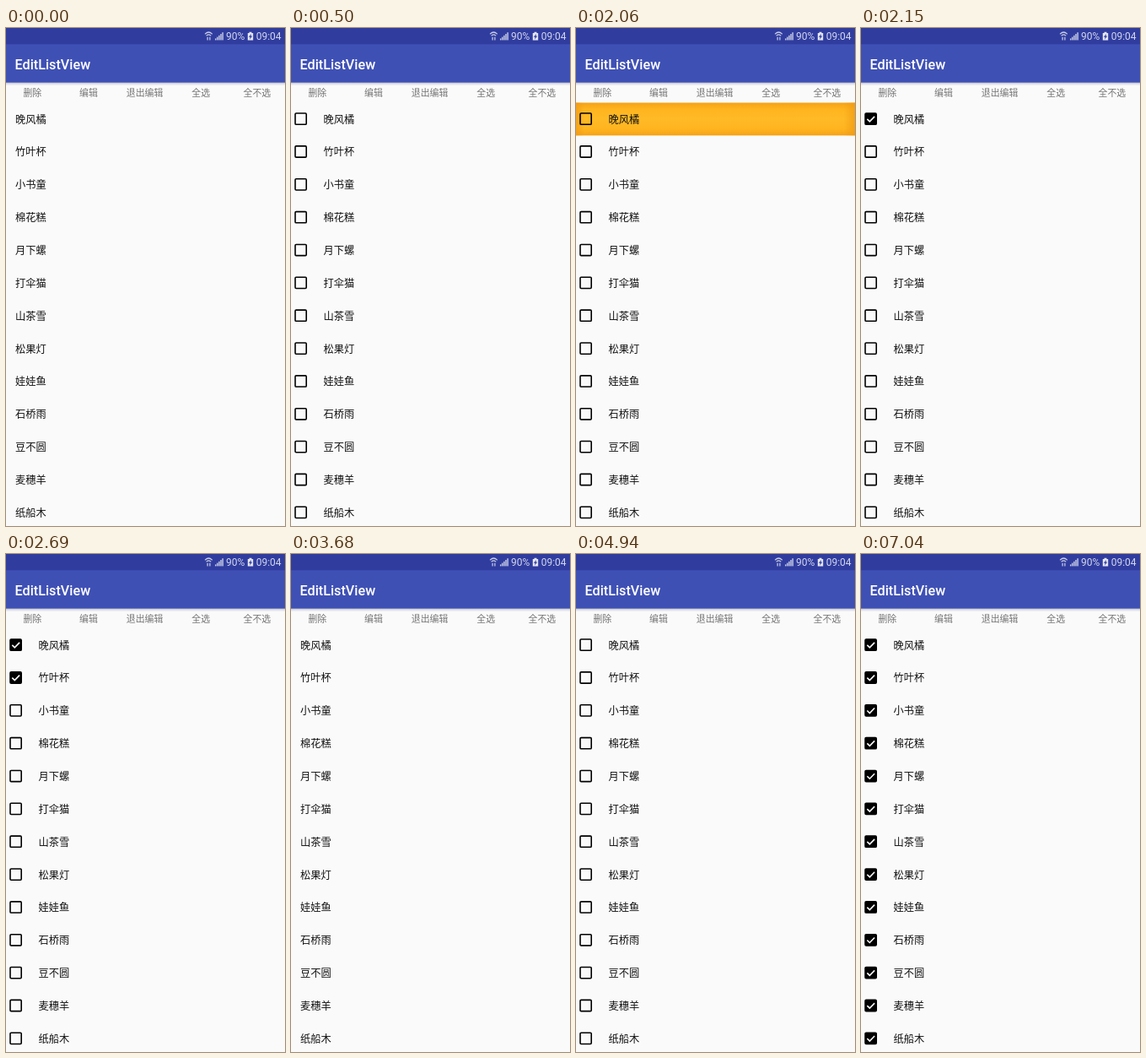
These frames come from a looping animation (331x590 px, 8 s). An HTML page:

```html
<!DOCTYPE html>
<html lang="zh-CN">
<head>
<meta charset="utf-8">
<title>EditListView</title>
<style>
  html, body { margin: 0; width: 100%; height: 100%; overflow: hidden; background: #fafafa; }
  svg { display: block; width: 331px; height: 590px; }
  text { font-family: "Noto Sans CJK SC", "Noto Sans CJK", sans-serif; }
  .latin { font-family: Roboto, sans-serif; }
  .tab { font-size: 10.9px; fill: #757575; text-anchor: middle; }
  .name { font-size: 12.25px; fill: #111; }
</style>
</head>
<body>
<svg id="stage" viewBox="0 0 331 590">
  <defs>
    <linearGradient id="shadow" x2="0" y2="1">
      <stop offset="0" stop-color="#b4b6cc"/>
      <stop offset=".5" stop-color="#dfdfe6"/>
      <stop offset="1" stop-color="#fafafa"/>
    </linearGradient>
    <linearGradient id="glowY" x2="0" y2="1">
      <stop offset="0" stop-color="#f5a217"/>
      <stop offset=".2" stop-color="#ffb41f"/>
      <stop offset=".5" stop-color="#ffba26"/>
      <stop offset=".8" stop-color="#ffb41f"/>
      <stop offset="1" stop-color="#f5a217"/>
    </linearGradient>
    <linearGradient id="glowX">
      <stop offset="0" stop-color="#ef9a14" stop-opacity=".7"/>
      <stop offset=".03" stop-color="#ef9a14" stop-opacity="0"/>
      <stop offset=".96" stop-color="#ef9a14" stop-opacity="0"/>
      <stop offset="1" stop-color="#ef9a14" stop-opacity=".75"/>
    </linearGradient>
  </defs>

  <rect width="331" height="590" fill="#fafafa"/>
  <rect y="64" width="331" height="4.5" fill="url(#shadow)"/>
  <rect width="331" height="64.6" fill="#3f50b5"/>
  <rect width="331" height="19.3" fill="#303d9f"/>

  <g fill="none" stroke="#ccd0e9" stroke-width="1.2" stroke-linecap="round">
    <path d="M236.4 6.9Q240.4 3.1 244.4 6.9M238 8.9Q240.4 6.7 242.8 8.9"/>
    <path d="M239.1 11v3M241.9 11v3"/>
  </g>
  <g id="signal" fill="#ccd0e9"></g>
  <g fill="#d3d6ec" font-size="12">
    <text class="latin" x="261" y="14.3">90%</text>
    <text class="latin" x="296.7" y="14.3">09:04</text>
  </g>
  <path d="M286.8 6h1.7V4.8h3V6h1.7v8.6h-6.4z" fill="#e4e6f4"/>
  <path d="M291 6.7l-3.1 4h1.8l-.6 3 3.1-4.2h-1.8z" fill="#303d9f"/>

  <text class="latin" x="10.5" y="48.7" font-size="16.2" font-weight="500" fill="#fff">EditListView</text>
  <g id="tabs"></g>
  <g id="glow">
    <rect width="331" height="38.85" fill="url(#glowY)"/>
    <rect width="331" height="38.85" fill="url(#glowX)"/>
  </g>
  <g id="rows"></g>
</svg>
<script>
const LOOP = 8000, ROW_TOP = 88.5, ROW_HEIGHT = 38.85;
const TABS = ["删除", "编辑", "退出编辑", "全选", "全不选"];
const NAMES = ["晚风橘", "竹叶杯", "小书童", "棉花糕", "月下螺", "打伞猫", "山茶雪",
  "松果灯", "娃娃鱼", "石桥雨", "豆不圆", "麦穗羊", "纸船木"];

// Each state holds from its start; `checked` counts ticked rows from the top.
const STATES = [
  { at: 0, editing: false, checked: 0, pressed: -1 },
  { at: 500, editing: true, checked: 0, pressed: -1 },
  { at: 2060, editing: true, checked: 0, pressed: 0 },
  { at: 2150, editing: true, checked: 1, pressed: -1 },
  { at: 2570, editing: true, checked: 1, pressed: 1 },
  { at: 2690, editing: true, checked: 2, pressed: -1 },
  { at: 3680, editing: false, checked: 0, pressed: -1 },
  { at: 4940, editing: true, checked: 0, pressed: -1 },
  { at: 7040, editing: true, checked: NAMES.length, pressed: -1 }
];

const byId = id => document.getElementById(id);

function add(parent, tag, attrs, content = "") {
  const node = document.createElementNS("http://www.w3.org/2000/svg", tag);
  for (const key in attrs) node.setAttribute(key, attrs[key]);
  node.textContent = content;
  return parent.appendChild(node);
}

const show = (node, visible) => node.setAttribute("visibility", visible ? "visible" : "hidden");

for (let i = 0; i < 5; i++) {
  const height = 2 + i * 1.8;
  add(byId("signal"), "rect", { x: 248 + i * 2.1, y: 14.4 - height, width: 1.4, height });
}

TABS.forEach((label, i) =>
  add(byId("tabs"), "text", { class: "tab", x: 31.3 + i * 66.65, y: 81.2 }, label));

const rows = NAMES.map((name, i) => {
  const y = ROW_TOP + ROW_HEIGHT * (i + 0.5);
  const row = add(byId("rows"), "g", { transform: `translate(0 ${y})` });
  const box = add(row, "rect", {
    x: 5, y: -6.9, width: 13.2, height: 13.2, rx: 1.1, stroke: "#000", "stroke-width": 1.6
  });
  const tick = add(row, "path", {
    d: "M7.3 -.1l3 3 5.8-6", fill: "none", stroke: "#fafafa", "stroke-width": 1.6
  });
  const label = add(row, "text", { class: "name", y: 4.7 }, name);
  return { box, tick, label };
});

function draw(time) {
  const { editing, checked, pressed } = STATES.findLast(state => state.at <= time);
  show(byId("glow"), pressed >= 0);
  byId("glow").setAttribute("transform", `translate(0 ${ROW_TOP + ROW_HEIGHT * pressed})`);
  rows.forEach(({ box, tick, label }, i) => {
    const ticked = i < checked;
    show(box, editing);
    show(tick, editing && ticked);
    box.setAttribute("fill", ticked ? "#000" : "none");
    label.setAttribute("x", editing ? 38.4 : 11);
  });
}

const start = performance.now();
function animate() {
  draw((performance.now() - start) % LOOP);
  requestAnimationFrame(animate);
}
animate();
</script>
</body>
</html>
```
